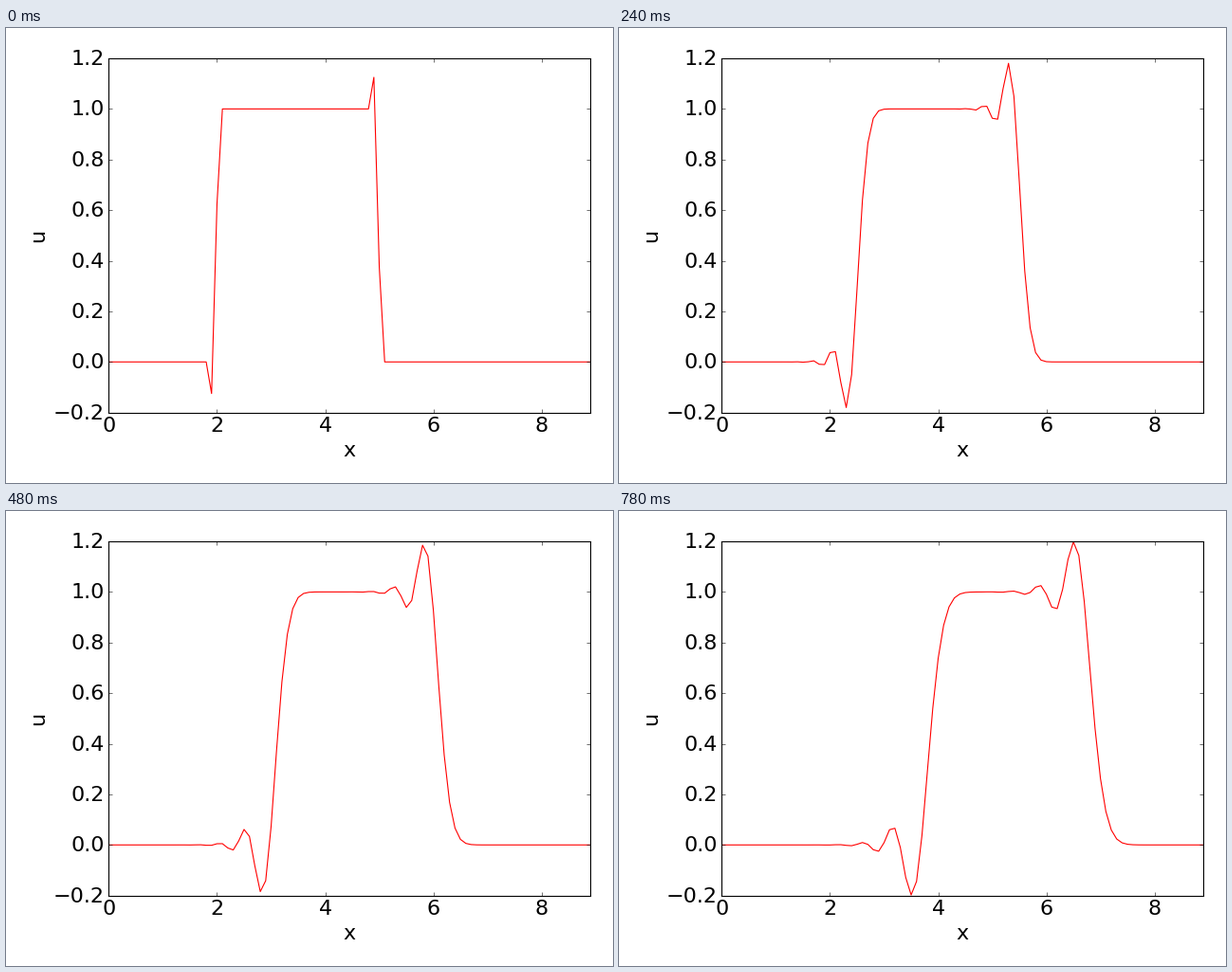
A matplotlib script that plays this animation: 640 by 480 pixels, repeating every 0.8 s.

```python
import numpy as np
import matplotlib.pyplot as plt
from matplotlib.animation import FuncAnimation
from matplotlib.transforms import ScaledTranslation

W, H, DPI = 640, 480, 80
FRAMES, INTERVAL = 40, 20
COURANT = 0.5

plt.style.use("classic")
plt.rcParams.update({
    "font.family": "DejaVu Sans",
    "font.size": 20,
    "axes.labelsize": 20,
    "xtick.labelsize": 20,
    "ytick.labelsize": 20,
})


def lax_wendroff(u, c):
    """Advance the advected profile by one time step."""
    new = u.copy()
    left, mid, right = u[:-2], u[1:-1], u[2:]
    new[1:-1] = mid - c / 2 * (right - left) + c**2 / 2 * (right - 2 * mid + left)
    return new


x = np.arange(90) / 10
u = np.where((x >= 2.0) & (x < 5.0), 1.0, 0.0)
profiles = []
for _ in range(FRAMES):
    u = lax_wendroff(u, COURANT)
    profiles.append(u)

fig = plt.figure(figsize=(W / DPI, H / DPI), dpi=DPI, facecolor="white")
left, right, top, bottom = 108.4, 616.0, 32.0, 405.65
ax = fig.add_axes([left / W, 1 - bottom / H, (right - left) / W, (bottom - top) / H])
ax.set_xlim(0, 8.9)
ax.set_ylim(-0.2, 1.2)
ax.set_xticks(range(0, 9, 2))
ax.set_yticks(np.arange(-1, 7) / 5)
ax.set_xlabel("x")
ax.set_ylabel("u")

# Centre the digits on their ticks.
nudge = ScaledTranslation(0, -1 / DPI, fig.dpi_scale_trans)
for label in ax.get_yticklabels():
    label.set_transform(label.get_transform() + nudge)

line, = ax.plot(x, profiles[0], color="red", lw=1)


def draw(i):
    line.set_ydata(profiles[i])
    return line,


anim = FuncAnimation(fig, draw, frames=FRAMES, interval=INTERVAL,
                     repeat=True, repeat_delay=0)
plt.show()
```
